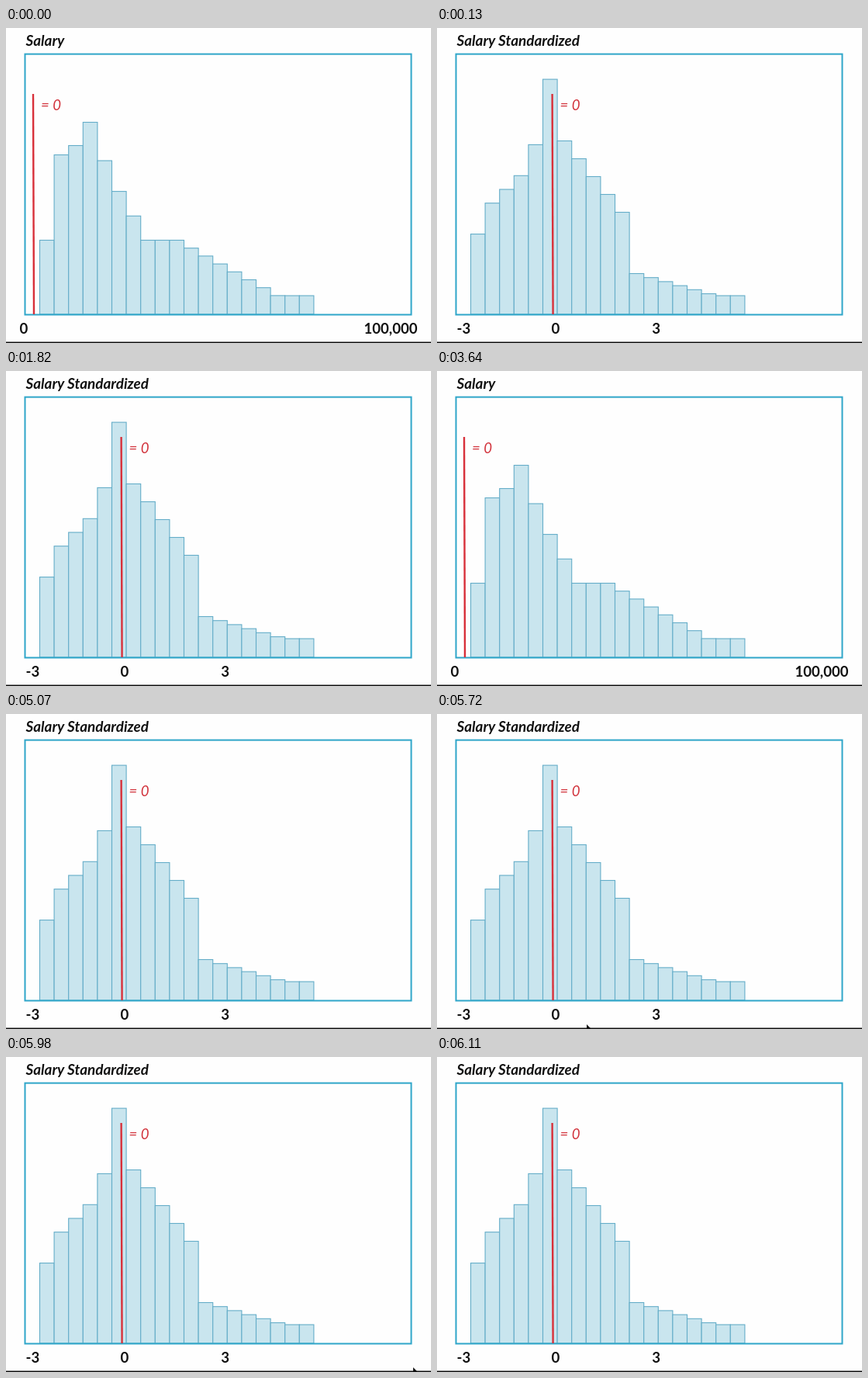
Recreate the animation shown at these times as an HTML page. Size 548x406 px, loop 7410 ms.

```html
<!DOCTYPE html>
<html lang="en">
<meta charset="utf-8">
<title>Salary histogram</title>
<style>
  html, body { margin: 0; width: 100%; height: 100%; overflow: hidden; background: #fefefe; }
  svg { display: block; }
  text { font: 700 18.6px Lato, sans-serif; fill: #111; }
  .title { font-size: 18.9px; font-style: italic; }
  .mean text { font: italic 400 18.6px Lato, sans-serif; fill: #d2343d; }
  .bars { fill: #c9e5ee; stroke: #64adc8; stroke-width: 1.1; }
  .mid { text-anchor: middle; }
  .end { text-anchor: end; }
</style>
<svg width="548" height="406" viewBox="0 0 548 406">
  <rect width="548" height="406" fill="#fefefe"/>
  <g id="raw">
    <text class="title" x="25.5" y="23">Salary</text>
    <g class="bars"></g>
    <text class="mid" x="23" y="393.5">0</text>
    <text class="end" x="530.5" y="393.5">100,000</text>
  </g>
  <g id="standardized">
    <text class="title" x="25.5" y="23">Salary Standardized</text>
    <g class="bars"></g>
    <text x="25.5" y="393.5">-3</text>
    <text class="mid" x="153" y="393.5">0</text>
    <text class="mid" x="282.7" y="393.5">3</text>
  </g>
  <rect x="24.5" y="33.6" width="498" height="335.9" fill="none" stroke="#2fa6c9" stroke-width="2"/>
  <g id="mean" class="mean">
    <path d="M35 85L36 369" stroke="#d8303a" stroke-width="2.4"/>
    <text x="45" y="105.5">= 0</text>
  </g>
  <path d="M0 405.3H548" stroke="#111" stroke-width="1.4"/>
  <path id="cursor" d="M0 0V10L2.4 8L4.2 12L6 11L4.3 7.4H7.3Z" fill="#111"/>
</svg>
<script>
  const LOOP = 7410, BASE = 369, LEFT = 43.5, BAR = 18.6, BARS = 19, STEP = 130;
  const LOW = 24, PLATEAU = 95.5;
  const byId = id => document.getElementById(id);
  const raw = byId('raw'), standardized = byId('standardized');
  const mean = byId('mean'), cursor = byId('cursor');

  // Steep start, exponential decay to a plateau, then a straight tail.
  function salaryHeight(i) {
    if (i < 1) return PLATEAU;
    if (i < 3) return 193.5 + 12 * i;
    if (i < 7) return 247.5 * 0.8 ** (i - 3);
    return Math.max(LOW, Math.min(PLATEAU, PLATEAU - 10.2 * (i - 9)));
  }

  // Cubic rise to the peak, straight slope down, then a low tail.
  function standardizedHeight(i) {
    if (i < 6) return 161 + 14 * (i - 2) + 3.7 * (i - 2) ** 3;
    if (i < 11) return 223.5 - 23 * (i - 6);
    return Math.max(LOW, 52.5 - 5.2 * (i - 11));
  }

  function drawBars(group, heightOf) {
    group.querySelector('.bars').innerHTML = Array.from({ length: BARS }, (_, i) => {
      const height = heightOf(i);
      return `<rect x="${LEFT + i * BAR}" y="${BASE - height}" width="${BAR}" height="${height}"/>`;
    }).join('');
  }
  drawBars(raw, salaryHeight);
  drawBars(standardized, standardizedHeight);

  const show = (el, on) => el.style.display = on ? '' : 'none';

  // Hard cuts between the two charts; the pointer sweeps past in three steps.
  const switches = [130, 260, 1820, 3640, 5070];
  const sweepStart = 5720;

  function render(now) {
    const t = now % LOOP;
    const isStandard = switches.filter(s => t >= s).length % 2 === 1;
    show(raw, !isStandard);
    show(standardized, isStandard);
    mean.setAttribute('transform', `translate(${isStandard ? 113.6 : 0} 0)`);

    const step = Math.floor((t - sweepStart) / STEP);
    show(cursor, step >= 0 && step < 3);
    cursor.setAttribute('transform', `translate(${359 + (step - 1) * 166} ${396 + Math.abs(step - 1) * 4})`);
    requestAnimationFrame(render);
  }
  render(performance.now());
</script>
</html>
```
